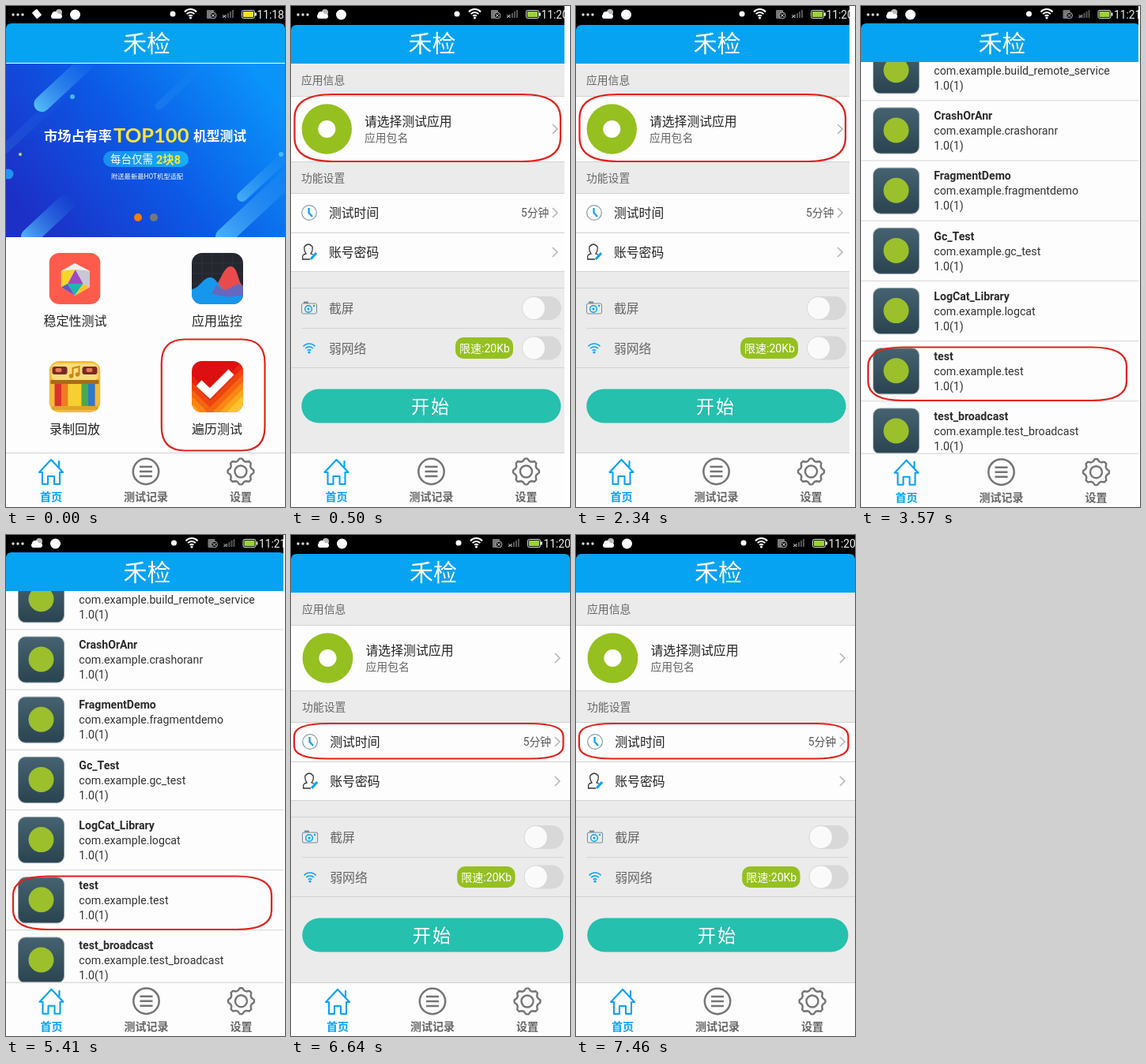
These frames come from a looping animation (353 by 635 pixels, 8 s). An HTML page:

```html
<!DOCTYPE html>
<html lang="zh-CN">
<head>
<meta charset="utf-8">
<style>
html, body { margin: 0; width: 100%; height: 100%; overflow: hidden; background: #fff; }
svg { display: block; width: 353px; height: 635px; font-family: Roboto, "Noto Sans CJK SC", "Noto Sans CJK", sans-serif; }
</style>
</head>
<body>
<svg id="stage" viewBox="0 0 353 635"></svg>
<script>
const BLUE = '#05a3f2', LIME = '#95c020', GREY = '#757575', PAPER = '#fdfdfd';

const text = (x, y, size, fill, str, extra = '') =>
  `<text x="${x}" y="${y}" font-size="${size}" fill="${fill}" ${extra}>${str}</text>`;
const rect = (x, y, w, h, fill, r = 0, extra = '') =>
  `<rect x="${x}" y="${y}" width="${w}" height="${h}" rx="${r}" fill="${fill}" ${extra}/>`;
const disc = (x, y, r, fill, extra = '') =>
  `<circle cx="${x}" cy="${y}" r="${r}" fill="${fill}" ${extra}/>`;
const shape = (d, fill) => `<path d="${d}" fill="${fill}"/>`;
const line = (d, color, w = 1, extra = '') =>
  `<path d="${d}" fill="none" stroke="${color}" stroke-width="${w}" ${extra}/>`;
const move = (x, y, body, scale = '1') =>
  `<g transform="translate(${x} ${y}) scale(${scale})">${body}</g>`;
// Hand-drawn looking frame: corner curves a wide and b high.
const mark = (x, y, w, h, a, b) => line(
  `M${x} ${y + b}q0 ${-b} ${a} ${-b}h${w - 2 * a}q${a} 0 ${a} ${b}v${h - 2 * b}q0 ${b} ${-a} ${b}h${2 * a - w}q${-a} 0 ${-a} ${-b}z`,
  '#e3211b', 2.2);
const round = 'stroke-linecap="round" stroke-linejoin="round"';
const bold = 'font-weight="700"', medium = 'font-weight="500"';

const gradients = `<defs>
  <linearGradient id="banner" x1="0" y1=".75" x2="1" y2=".25">
    <stop offset="0" stop-color="#1c2fc6"/><stop offset=".5" stop-color="#0b5ae6"/><stop offset="1" stop-color="#0a94fa"/>
  </linearGradient>
  <linearGradient id="meteor"><stop offset="0" stop-color="#5ccbfd"/><stop offset="1" stop-color="#2a86f2" stop-opacity="0"/></linearGradient>
  <linearGradient id="pill"><stop offset="0" stop-color="#1b8df2"/><stop offset="1" stop-color="#17aef5"/></linearGradient>
  <linearGradient id="slate" x2="0" y2="1"><stop offset="0" stop-color="#466270"/><stop offset="1" stop-color="#2a4351"/></linearGradient>
  <clipPath id="tile"><rect width="65" height="65" rx="13"/></clipPath>
</defs>`;

const wifi = (x, y, color, w) =>
  line([3, 6.5, 10].map(r => `M${x - r * .75} ${y - r * .75}A${r} ${r} 0 0 1 ${x + r * .75} ${y - r * .75}`).join(''), color, w) +
  disc(x, y, 1.6, color);

function statusBar({ left, right, time, clock, power }) {
  const pen = left === 64 ? rect(-4, -5, 8, 10, '#fff', 1, 'transform="translate(39 10) rotate(-40)"') : '';
  const cloud = disc(3, -2, 4, '#bbb') + disc(-2, 1, 4, '#fff') + rect(-7, 0, 14, 6, '#fff', 3);
  const indicators = disc(0, 10, 3.5, '#fff') + wifi(22.5, 15, '#fff', 2) +
    rect(43, 5, 9, 11, '#777', 1) + disc(51, 12, 4, '#111', 'stroke="#aaa"') + line('M49 10l4 4m0-4l-4 4', '#bbb') +
    line('M64 15v-2m3 2v-4m3 4v-6m3 6v-8m3 8v-10', '#555', 2) + line('M63 11l4 4m0-4l-4 4', '#aaa') +
    rect(87.5, 5.5, 16, 10, '#111', 2, 'stroke="#ddd"') + rect(89, 7, 13, 7, power) + rect(104, 8.5, 2, 4, '#ddd');
  return rect(0, 0, 353, 30, '#000') + [9, 15, 21].map(x => disc(x, 11, 1.7, '#ddd')).join('') + pen +
    move(left, 10, cloud) + disc(left + 23.5, 11, 6.5, '#fff') +
    move(right, 0, indicators) + text(clock, 15.5, 13.8, '#eee', time);
}

const header = (top, bottom, x) =>
  shape(`M0 ${bottom}V${top + 6}Q1 ${top} 7 ${top}H346Q352 ${top} 353 ${top + 6}V${bottom}Z`, BLUE) +
  text(x, 58, 30, '#fff', '禾检', 'font-weight="200"');

function gear() {
  const points = [];
  for (let i = 0; i < 32; i++) {
    const a = (i - 2.5) * Math.PI / 16, r = i % 4 < 2 ? 13.8 : 16.5;
    points.push(`${(r * Math.cos(a)).toFixed(1)} ${(r * Math.sin(a)).toFixed(1)}`);
  }
  return line(`M${points.join('L')}Z`, GREY, 2.4, round) + disc(0, 0, 7.5, 'none', `stroke="${GREY}" stroke-width="2.4"`);
}

const tabs = (dx, dy) => rect(0, 566 + dy, 353, 70, PAPER) + rect(0, 566 + dy, 353, 1, '#cfcfcf') + move(dx, dy,
  line('M42 591L57 575L72 591H68V606H61V596H53V606H46V591ZM67 584V577', BLUE, 2.1, round) +
  disc(177, 590, 16.2, 'none', `stroke="${GREY}" stroke-width="2.5"`) +
  line('M169 584h16m-16 6h16m-16 6h16', GREY, 2.5) + move(297, 590, gear()) +
  text(43, 627, 14, BLUE, '首页', bold) + text(149, 627, 14, '#666', '测试记录', bold) +
  text(283, 627, 14, '#666', '设置', bold));

const tile = (x, y, body) => move(x, y, `<g clip-path="url(#tile)">${body}</g>`);

const meteor = (x, y, len, w, opacity) =>
  rect(0, -w / 2, len, w, 'url(#meteor)', w / 2, `opacity="${opacity}" transform="translate(${x} ${y}) rotate(-43)"`);

function banner() {
  return `<svg y="73" width="353" height="220" viewBox="0 73 353 220">` + rect(0, 73, 353, 220, 'url(#banner)') +
    meteor(38, 131, 100, 20, .9) + meteor(-8, 187, 130, 12, .15) + meteor(22, 300, 85, 22, .9) +
    meteor(268, 300, 150, 22, .8) + meteor(294, 246, 95, 13, .7) + meteor(190, 130, 100, 10, .15) +
    disc(3, 213, 6.5, '#2391f5') + disc(18, 188, 2, '#bdd86b') + disc(348, 188, 3, '#48b6fa') + disc(84, 115, 3, '#46b4f9') +
    text(48, 171, 17.2, '#fff', '市场占有率', bold) +
    text(136, 173, 25.5, '#ffe43b', 'TOP100', bold + ' font-family="Lato, sans-serif"') +
    text(237, 171, 16.8, '#fff', '机型测试', bold) +
    rect(123, 184, 108, 20, 'url(#pill)', 10) + text(132, 199, 13.5, '#fff', '每台仅需', medium) +
    text(190, 199.5, 14.5, '#ffe43b', '2块8', bold) + text(133, 219, 8.3, '#fff', '附送最新最HOT机型适配') +
    disc(167, 268, 5, '#ff7b0a') + disc(187, 268, 5, '#77777a') + '</svg>';
}

function home() {
  const gem = rect(0, 0, 65, 65, '#ff5b4c') + move(5.5, 5.5,
    shape('M33 9L56 21V46L33 59L12 46V21Z', '#eee') +
    shape('M12 21L34 19L22 41L12 46Z', '#f6d52b') + shape('M34 19L46 41H22Z', '#a149c4') +
    shape('M22 41H46L33 59Z', '#20b6ae') + shape('M34 19L56 21V46L46 41Z', '#c8c7d3') +
    shape('M12 46L22 41L33 59Z', '#6b54bd') + shape('M56 46L46 41L33 59Z', '#f6c62c'), '.82');
  const chart = rect(0, 0, 65, 65, '#25272f') +
    line('M0 13H65M0 26H65M0 39H65M13 0V65M26 0V65M39 0V65M52 0V65', '#353842', .7) +
    shape('M18 55C35 45 39 17 49 17S58 38 65 42V65H18Z', '#e94b4c') +
    shape('M0 46C10 45 15 30 24 31S35 47 43 47S54 37 65 42V65H0Z', '#1597ee') +
    shape('M32 40Q36 47 43 47Q53 42 58 39L65 42V54Q40 58 25 51Z', '#6768bd');
  const toy = rect(0, 0, 65, 65, '#f0bd3c') + rect(3, 3, 59, 22, '#f8dc7a', 7) +
    rect(4, 7, 19, 10, '#7a2b22', 3) + rect(42, 7, 19, 10, '#7a2b22', 3) +
    rect(8, 9, 8, 5, '#e7795c', 2) + rect(47, 9, 8, 5, '#e7795c', 2) +
    line('M30 19V9L38 7V17', '#c98516', 2) + disc(28, 19, 2.7, '#c98516') + disc(36, 17, 2.7, '#c98516') +
    rect(2, 24, 61, 5, '#a96b18') +
    ['#d9332b', '#ef7b22', '#f6cf31', '#f6cf31', '#4aa94c', '#2f79cc'].map((c, i) => rect(7 + i * 8.5, 29, 8.6, 29, c)).join('') +
    rect(3, 57, 59, 5, '#e0a52b', 2);
  const bands = ['#e6260f', '#ee4410', '#f56511', '#fb8714', '#ffa81c', '#ffc530'];
  const check = bands.map((c, i) => shape(`M-20 ${i * 9 - 2}L23 ${i * 9 + 41}L73 ${i * 9 - 9}V140H-20Z`, c)).join('');
  return rect(0, 0, 353, 635, PAPER) + statusBar({ left: 64, right: 211, time: '11:18', clock: 317.5, power: '#f5e31f' }) +
    header(22, 72, 148) + banner() +
    tile(54.5, 313, gem) + tile(235, 313, chart) + tile(54.5, 450, toy) +
    tile(235, 450, rect(0, 0, 65, 65, '#dc1010') + check + line('M9 28L23 41L50 14', '#fff', 10)) +
    text(47.5, 405, 16, '#222', '稳定性测试') + text(235, 405, 16, '#222', '应用监控') +
    text(55, 542, 16, '#222', '录制回放') + text(235, 542, 16, '#222', '遍历测试') +
    mark(196.8, 422.5, 130.7, 141, 30, 30) + tabs(0, 0);
}

function settings(bar, titleX, wide, highlight) {
  const chevron = y => line(`M331 ${y - 6}l6 6l-6 6`, '#b8b8b8', 1.7);
  const toggle = y => rect(292, y - 15, 50, 30, '#d8d8d8', 15) + disc(307, y, 14, '#fafafa');
  const person = line('M15 321Q13 315 19 314Q16 309 17 305Q22 299 27 305Q28 310 25 314L28 315M14 321H24', '#333', 1.3) +
    line('M25 321L32 313', BLUE, 3);
  const camera = rect(13.5, 377, 19, 13, 'none', 2, 'stroke="#7a8c96"') + rect(16, 374.5, 6, 2.5, '#7a8c96') +
    disc(22, 384, 4.3, 'none', `stroke="${BLUE}" stroke-width="1.4"`) + disc(22, 384, 1.5, BLUE) + disc(29, 380, 1.2, BLUE);
  const body = disc(45.3, 156, 31.7, LIME) + disc(45.3, 156, 11, '#fff') +
    text(13, 99, 13.8, '#666', '应用信息') + text(93, 152, 15.8, '#222', '请选择测试应用') +
    text(93, 172, 13.8, '#666', '应用包名') + chevron(156) + text(13, 223, 13.8, '#666', '功能设置') +
    disc(23, 262, 9.3, '#fff', 'stroke="#8a9ba5" stroke-width="1.2"') + line('M22.5 256V262L27 267', BLUE, 2.2) +
    text(48, 268, 15.8, '#222', '测试时间') + text(291, 267, 13.8, '#555', '5分钟') + chevron(262) +
    person + text(48, 318, 15.8, '#222', '账号密码') + chevron(312) +
    line('M13 408.5H342', '#d4d4d4') + camera + text(48, 389, 15.8, '#666', '截屏') + toggle(383) +
    wifi(23, 439, BLUE, 1.5) + text(48, 440, 15.8, '#666', '弱网络') +
    rect(208, 420, 73, 27, LIME, 10) + text(213, 439, 14, '#fff', '限速:20Kb') + toggle(433.5) +
    rect(13.3, 485.5, 328.2, 43, '#25c0ae', 21.5) + text(152, 516, 23, '#fff', '开始', 'letter-spacing="2"');
  return rect(0, 0, 353, 635, '#ebebeb') + statusBar(bar) + header(24, 73, titleX) +
    rect(0, 114, 353, 83, PAPER) + rect(0, 237, 353, 99, PAPER) +
    [114, 197, 237, 287, 336, 357, 458].map(y => rect(0, y, 353, 1, '#d2d2d2')).join('') +
    (wide ? move(.9, 0, body, '1.006 1') + tabs(2, 1) : body + tabs(.5, 0)) + highlight;
}

function appList() {
  const names = ['build_remote_service', 'CrashOrAnr', 'FragmentDemo', 'Gc_Test', 'LogCat_Library', 'test', 'test_broadcast'];
  const rows = names.map((name, i) => {
    const id = name === 'LogCat_Library' ? 'logcat' : name.toLowerCase();
    return move(0, 43.3 + i * 76.2,
      rect(15.5, 9.5, 58, 58, 'url(#slate)', 9, 'stroke="#8d9ba2"') + disc(44.5, 38, 16, '#9bc02c') +
      text(92.3, 24.7, 14.1, '#2a2a2a', name, bold) + text(92.3, 43.7, 14.2, '#333', 'com.example.' + id) +
      text(92.3, 62.7, 14.2, '#333', '1.0(1)') + rect(0, 76, 353, 1, '#d5d5d5'));
  }).join('');
  return rect(0, 0, 353, 635, PAPER) + rows + statusBar({ left: 39, right: 212.5, time: '11:21', clock: 320, power: '#9bd13a' }) +
    header(22, 71, 148.5) + mark(9, 432.5, 327, 67.5, 44, 24) + tabs(.5, .7);
}

const scenes = [
  { start: 0, width: 353, body: home() },
  { start: 500, width: 346, body: settings({ left: 40, right: 210, time: '11:20', clock: 316.5, power: '#9bd13a' }, 148.5, false, mark(4.5, 112, 336.5, 85, 48, 30)) },
  { start: 3570, width: 351, body: appList() },
  { start: 6640, width: 353, body: settings({ left: 41, right: 212, time: '11:20', clock: 319.5, power: '#9bd13a' }, 150, true, mark(4, 239, 340.5, 44.5, 42, 16)) },
];

const stage = document.getElementById('stage');
stage.innerHTML = gradients + scenes.map(s =>
  `<svg class="scene" style="width:${s.width}px;height:634px" width="${s.width}" height="634" viewBox="0 0 ${s.width} 634">${s.body}</svg>`).join('');
const layers = stage.querySelectorAll('.scene');

function draw(now) {
  const t = now % 8000;
  const current = scenes.findLastIndex(s => t >= s.start);
  layers.forEach((layer, i) => layer.style.display = i === current ? '' : 'none');
  requestAnimationFrame(draw);
}
draw(0);
</script>
</body>
</html>
```
